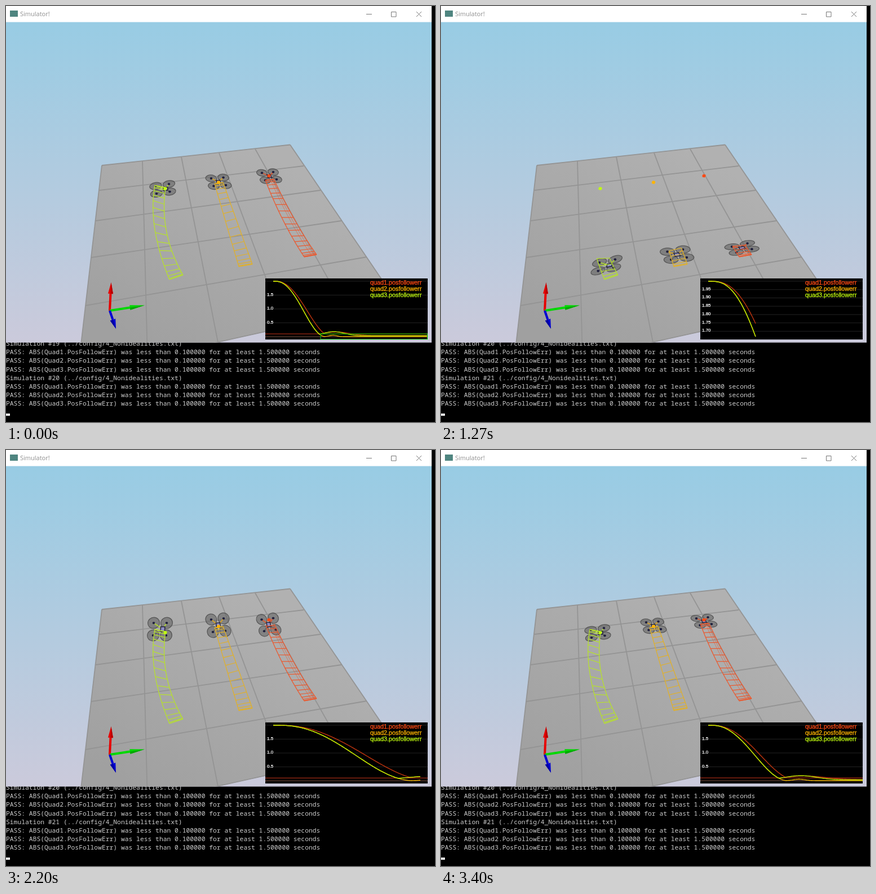
Animation of 761 by 736 pixels, one loop 3470 ms. Source, as an HTML page:

```html
<!DOCTYPE html>
<html lang="en">
<head>
<meta charset="utf-8">
<title>Simulator!</title>
<style>
html, body { margin: 0; width: 100%; height: 100%; overflow: hidden; background: #000; }
svg { display: block; }
.console { font: 11.33px "Noto Sans Mono", monospace; fill: #ccc; white-space: pre; }
.title { font: 11px "Open Sans", sans-serif; fill: #8e8e8e; }
.plot { font: 10.8px "Liberation Sans", sans-serif; }
.tick { font: 8px "Liberation Sans", sans-serif; fill: #fff; stroke: #fff; stroke-width: .25; }
</style>
</head>
<body>
<svg width="761" height="736" viewBox="0 0 761 736">
  <defs>
    <linearGradient id="sky" x1="0" y1="0" x2="0" y2="1">
      <stop offset="0" stop-color="#98cce4"/><stop offset="1" stop-color="#cbcadb"/>
    </linearGradient>
    <linearGradient id="floor" gradientUnits="userSpaceOnUse" x1="440" y1="250" x2="240" y2="600">
      <stop offset="0" stop-color="#b1b1b1"/><stop offset="1" stop-color="#a0a0a0"/>
    </linearGradient>
    <clipPath id="view"><rect width="755" height="595.5"/></clipPath>
    <clipPath id="panel"><rect x="460" y="482" width="288" height="108"/></clipPath>
  </defs>
  <rect width="761" height="736"/>
  <g id="console" class="console"></g>
  <rect y="721" width="7" height="4" fill="#f2f2f2"/>
  <g clip-path="url(#view)">
    <rect y="28" width="755" height="568" fill="url(#sky)"/>
    <g id="ground"></g>
    <g id="scene"></g>
    <g id="axes"></g>
    <rect width="755" height="28.5" fill="#fff"/>
    <rect x="7" y="8" width="14" height="11" fill="#4f8580"/>
    <text class="title" x="25" y="18">Simulator!</text>
    <path d="M639 14.5h10M683.5 10.5h8.5v8.5h-8.5zM728 10l9 9m0-9l-9 9" fill="none" stroke="#777"/>
    <rect x="460" y="482" width="288" height="108"/>
    <g id="plot" clip-path="url(#panel)"></g>
    <g id="legend" class="plot"></g>
  </g>
</svg>
<script>
const el = id => document.getElementById(id);
const LOOP = 3470, FRAME = 200 / 3, RESET = 12, FRAMES = 52;

// Simulation clock (1 unit = 1 plot pixel before the plot starts to shrink)
const clock = [[12, 4.7], [13, 16], [25, 152], [33, 261], [45, 397], [51, 485], [52, 740], [64, 876]];

// pose: time, centre x y, rotor axis u, rotor axis v; rails: quadratic curves
const quads = [
  { name: "quad1", color: "#ff4a14", rail: "#ea5a30", span: 280, shift: 0, goal: [466.5, 300.5],
    tail: [.04, .13, 300, 90], pass: 386,
    rails: [[529, 444, 489.5, 384, 460, 308], [551, 440, 513, 387, 475, 306]],
    poses: [
      [16, 541, 441.5, 29.5, -6, 8.5, 10], [75, 537, 433, 28, -6, 8, 10],
      [152, 499, 375, 22.5, -3.5, 7.5, 12.5], [261, 466, 309, 20.5, -2.5, 4.5, 20.5],
      [330, 465, 302, 20.5, -2.5, 5, 17], [397, 465.5, 303, 20.5, -2.5, 6.5, 10.5],
      [485, 466.5, 303, 20.5, -2, 6.5, 12], [740, 467, 301, 20, -1.5, 6, 13]] },
  { name: "quad2", color: "#ffb400", rail: "#dfb02e", span: 250, shift: 0, goal: [377, 312],
    tail: [0, .05, 286, 26], pass: 227,
    rails: [[413, 461, 392.5, 392.5, 370, 314], [437, 457, 411, 385.5, 385, 312]],
    poses: [
      [16, 425, 459, 29, -6, 8, 10], [75, 421, 447, 28, -4, 7, 13],
      [152, 395, 366, 24.5, -3.5, 4.5, 24.5], [261, 376.5, 310, 22, -2, 3, 22],
      [397, 377, 311, 21.5, -1.5, 4.5, 13.5]] },
  { name: "quad3", color: "#c0fa10", rail: "#b6e02e", span: 250, shift: 5, goal: [282.5, 323],
    tail: [.03, .15, 291, 70], pass: 342,
    rails: [[290, 484, 251, 389.5, 264, 317], [314, 476, 271.5, 402, 283, 321]],
    poses: [
      [16, 302, 478.5, 29, -10, -1, 12], [75, 296, 466, 28, -7, -2, 14],
      [152, 273, 382, 25, 8.5, -7, 23.5], [261, 273, 317, 23, 0, -1, 22],
      [330, 275, 318, 23, -2, 0, 17], [397, 276.5, 322, 24, -4, 1, 12.5],
      [485, 278, 323.5, 23.5, -3.5, 1.5, 13.5]] }
];

const fix = n => +n.toFixed(2);
const line = (pts, attr) => `<polyline points="${pts.map(p => fix(p[0]) + "," + fix(p[1])).join(" ")}" fill="none" ${attr}/>`;

function lerpKeys(keys, x) {
  let i = 0;
  while (i < keys.length - 2 && x >= keys[i + 1][0]) i++;
  const [a, b] = [keys[i], keys[i + 1]];
  return a[1] + (b[1] - a[1]) * (x - a[0]) / (b[0] - a[0]);
}

// Smooth interpolation through uneven keys
function poseAt(keys, t) {
  const last = keys.length - 1;
  if (t <= keys[0][0]) return keys[0].slice(1);
  if (t >= keys[last][0]) return keys[last].slice(1);
  let i = 0;
  while (t >= keys[i + 1][0]) i++;
  const a = keys[i], b = keys[i + 1], h = b[0] - a[0], s = (t - a[0]) / h;
  const slope = (n, k) => n < 1 || n >= last ? 0 :
    (keys[n + 1][k] - keys[n - 1][k]) / (keys[n + 1][0] - keys[n - 1][0]);
  return a.slice(1).map((v, j) => {
    const k = j + 1, d = b[k] - v;
    const m0 = slope(i, k) * h, m1 = slope(i + 1, k) * h;
    return v + s * m0 + s * s * (3 * d - 2 * m0 - m1) + s * s * s * (m0 + m1 - 2 * d);
  });
}

// Distance left to the goal, 2 falling to 0
function approach(q, t) {
  const x = Math.min(1, t / q.span);
  return 1 + Math.cos(Math.PI * x ** (1.2 + .25 * (1 - x) ** 8));
}
function error(q, t) {
  const [base, amp, mid, width] = q.tail;
  return Math.max(approach(q, t), base + amp * Math.exp(-(((t - mid) / width) ** 2)));
}

function railPoint(r, s) {
  const a = (1 - s) ** 2, b = 2 * s * (1 - s), c = s * s;
  return [a * r[0] + b * r[2] + c * r[4], a * r[1] + b * r[3] + c * r[5]];
}
function travel(q, t) {
  const p = 1 - approach(q, t) / 2;
  return p * (1 + .25 * (1 - p));
}

function drawTrail(q, t) {
  if (t < 20) return "";
  const end = travel(q, t), [l, r] = q.rails;
  const stroke = w => `stroke="${q.rail}" stroke-width="${w}"`;
  const along = mix => Array.from({ length: 25 }, (_, i) => {
    const a = railPoint(l, end * i / 24), b = railPoint(r, end * i / 24);
    return [a[0] + (b[0] - a[0]) * mix, a[1] + (b[1] - a[1]) * mix];
  });
  let out = line(along(0), stroke(1.3)) + line(along(1), stroke(1.3));
  if (q.name === "quad1") out += line(along(.6), stroke(.6)) + line(along(.8), stroke(.6));
  for (let k = 0; k <= Math.min(t, q.span + 4); k += 14) {
    const s = travel(q, k);
    out += line([railPoint(l, s), railPoint(r, s)], stroke(1.2));
  }
  return out;
}

function drawQuad(q, t) {
  const [x, y, ux, uy, vx, vy] = poseAt(q.poses, t);
  const at = (a, b) => [x + a * ux + b * vx, y + a * uy + b * vy];
  const matrix = p => `transform="matrix(${[ux, uy, vx, vy, ...p].map(fix).join(" ")})" vector-effect="non-scaling-stroke"`;
  const hub = [x + q.shift, y];
  const rotors = [at(-.5, -.5), at(.5, -.5), at(-.5, .5), at(.5, .5)];
  let out = rotors.map(p => `<circle r=".45" ${matrix(p)} fill="#555" fill-opacity=".5" stroke="#555" stroke-width="1.2"/>`).join("");
  rotors.forEach((p, i) => {
    out += line([hub, p], `stroke="${i < 2 ? q.color : "#555"}" stroke-opacity=".7" stroke-width="1.8"`);
    out += `<ellipse cx="${fix(p[0])}" cy="${fix(p[1])}" rx="2.3" ry="2.1" fill="#20203c"/>`;
  });
  return out + `<rect x="-.16" y="-.19" width=".32" height=".38" ${matrix(hub)} fill="#8d8dc2" stroke="#24243c" stroke-width="1.5"/>`;
}

function drawGoal(q) {
  const [x, y] = q.goal;
  return `<path d="M${x - 3} ${y - 1}l2 -2 4 1 0 3 -2 2 -4 -1z" fill="${q.color}"/>`;
}

function drawPlot(t) {
  const X0 = 474, TOP = 487, H = 98, W = 274;
  const zoom = Math.min(1, W / t), n = Math.max(8, Math.ceil(t * zoom / 1.5));
  const curves = quads.map(q => Array.from({ length: n + 1 }, (_, i) => [t * i / n, error(q, t * i / n)]));
  const low = Math.min(...curves.flat().map(p => p[1]));
  const range = Math.max(2 - low, 1e-5);
  const px = v => X0 + v * zoom, py = e => TOP + (2 - e) / range * H;
  let step = 10 ** Math.ceil(Math.log10(range / 10));
  if (range / step <= 5) step /= 2;
  const digits = Math.max(0, -Math.floor(Math.log10(step) + 1e-9));
  const level = (y, c, w = 1) => line([[460, y], [748, y]], `stroke="${c}" stroke-width="${w}"`);
  let out = "", labels = "";
  for (let i = 0; i * step <= range * 1.02; i++) {
    const e = 2 - i * step, y = py(e);
    out += level(y, "#222");
    if (i && e > .01) labels += `<text class="tick" x="463" y="${fix(y + 1)}">${e.toFixed(digits)}</text>`;
  }
  if (low < .1) out += level(py(.1), "#a02a14", 1.2) + level(py(0), "#6b4030");
  curves.forEach((c, i) => {
    out += line(c.map(p => [px(p[0]), py(p[1])]), `stroke="${["#c0340e", "#e8b000", "#b8e800"][i]}" stroke-width="1.4"`);
  });
  for (const q of quads) if (t > q.pass + 420) {
    const x = px(q.pass);
    out += `<rect x="${fix(x)}" y="${fix(py(.1))}" width="${fix(747.5 - x)}" height="9.5" fill="none" stroke="#00b400" stroke-width="1.2"/>`;
  }
  return out + labels;
}

function drawConsole(run) {
  const rows = [];
  for (const n of [run - 1, run]) {
    rows.push(`Simulation #${n} (../config/4_Nonidealities.txt)`);
    for (const i of [1, 2, 3])
      rows.push(`PASS: ABS(Quad${i}.PosFollowErr) was less than 0.100000 for at least 1.500000 seconds`);
  }
  return rows.map((s, i) => `<text x="0" y="${fix(601.2 + i * 15.14)}">${s}</text>`).join("");
}

function drawGround() {
  const back = [[170, 282], [242, 274], [311, 267], [378, 260], [442, 253], [504, 245.5]];
  const near = [[127, 650], [251, 623], [376, 595], [494, 569], [606, 544], [694, 524]];
  const rows = [[166, 326, 528, 283], [159, 380, 558, 326], [151, 445, 595, 380], [141, 530, 640, 444]];
  const grid = 'stroke="#949494" stroke-width="1.8"';
  return `<polygon points="${[...back, ...near.slice().reverse()].join(" ")}" fill="url(#floor)"/>` +
    back.map((p, i) => line([p, near[i]], grid)).join("") +
    rows.map(r => line([r.slice(0, 2), r.slice(2)], grid)).join("") +
    line([back[0], back[5]], grid) + line([near[0], near[5]], grid);
}

function drawArrow(tip, neck, half, color, dark) {
  const o = [184, 539], dx = tip[0] - o[0], dy = tip[1] - o[1], d = Math.hypot(dx, dy);
  const nx = -dy / d * half, ny = dx / d * half;
  const base = [o[0] + dx * neck, o[1] + dy * neck];
  return line([o, base], `stroke="${color}" stroke-width="4"`) +
    `<polygon points="${base[0] + nx},${base[1] + ny} ${tip} ${base[0] - nx},${base[1] - ny}" fill="${color}"/>` +
    `<polygon points="${base[0] + nx},${base[1] + ny} ${tip} ${base}" fill="${dark}"/>`;
}

el("ground").innerHTML = drawGround();
el("axes").innerHTML = drawArrow([186.5, 489], .6, 4.5, "#e60000", "#b80000") +
  drawArrow([246, 529.5], .58, 4.2, "#00d800", "#00a800") +
  drawArrow([195, 571], .5, 5, "#0000d2", "#0000a0");
el("legend").innerHTML = quads.map((q, i) =>
  `<text x="646" y="${493 + i * 11}" fill="${q.color}" stroke="${q.color}" stroke-width=".3">${q.name}.posfollowerr</text>`).join("");

let shown = -1;
function render(ms) {
  let f = Math.min(FRAMES - 1, Math.floor((ms + 3.34) / FRAME));
  if (Math.round(f * FRAME / 10) * 10 > ms) f--;
  if (f === shown) return;
  shown = f;
  const t = lerpKeys(clock, f < RESET ? f + FRAMES : f);
  el("scene").innerHTML = [drawQuad, drawTrail, drawGoal].map(draw => quads.map(q => draw(q, t)).join("")).join("");
  el("plot").innerHTML = drawPlot(t);
  el("console").innerHTML = drawConsole(f < RESET ? 20 : 21);
}

const start = performance.now();
function tick() {
  render((performance.now() - start) % LOOP);
  requestAnimationFrame(tick);
}
tick();
</script>
</body>
</html>
```
